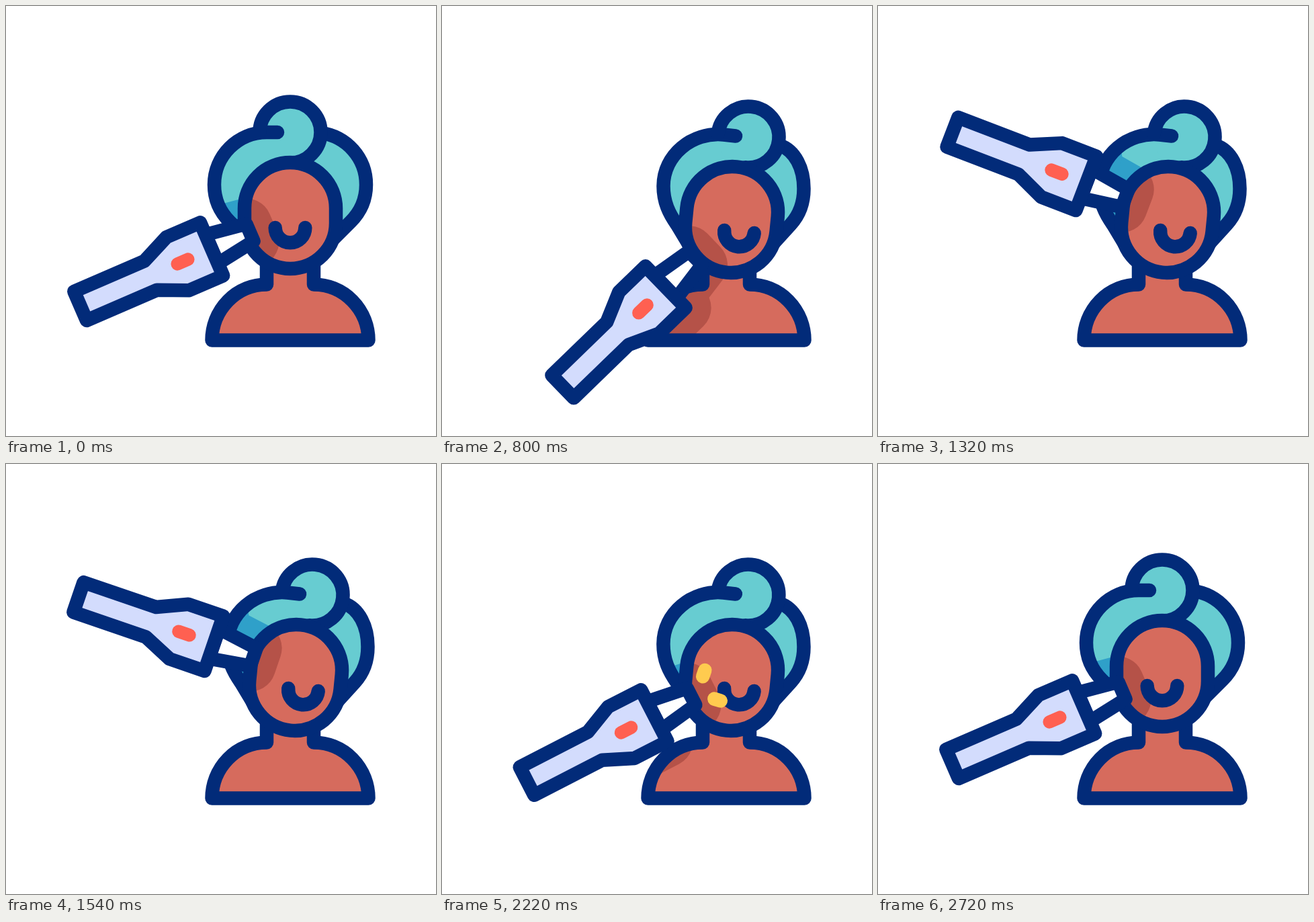
Write an HTML page with a canvas that moves like this. It is 640 px wide and 640 px high and loops after 3000 ms.

```html
<!DOCTYPE html>
<html lang="en">
<head>
<meta charset="utf-8">
<title>Skin treatment</title>
<style>
  html, body { margin: 0; height: 100%; overflow: hidden; background: #fff; }
  canvas { display: block; width: 100vw; height: 100vh; }
</style>
</head>
<body>
<canvas id="stage" width="640" height="640"></canvas>
<script>
const ctx = document.getElementById('stage').getContext('2d');
const LOOP = 3000, LINE = 20.5, SHADOW = 76;
const NAVY = '#022b79', SKIN = '#d66b5d', SKIN_DARK = '#b55248',
      CLOTH = '#67ccd1', CLOTH_DARK = '#2fa0c9',
      SHELL = '#d3dcfd', RED = '#ff6051', YELLOW = '#ffcb4f';

// Device pose over time: [ms, x, y, degrees], centred on its button
const POSES = [
  [200, 263, 380.5, -23.4], [380, 278, 402, -30], [690, 300, 454, -45],
  [800, 299, 451, -44.1], [1120, 255, 391, -16], [1200, 248, 325, 2],
  [1280, 266, 247, 21], [1540, 265, 252, 18.9], [1680, 250, 335, -4],
  [1820, 253.5, 405.5, -24], [2220, 274, 396, -27.2], [2365, 284, 416, -34],
  [2715, 263, 380.5, -23.4]
];
const FLASHES = [200, 2064], FLASH_HALF = 105;

const clamp = v => Math.min(1, Math.max(0, v));
const ease = (t, from, to) => {
  const u = clamp((t - from) / (to - from));
  return u * u * (3 - 2 * u);
};

// Monotone cubic interpolation of one pose column
function track(t, col) {
  const last = POSES.length - 1;
  const slope = i => (POSES[i + 1][col] - POSES[i][col]) / (POSES[i + 1][0] - POSES[i][0]);
  const tangent = i => {
    if (i === 0 || i === last) return 0;
    const a = slope(i - 1), b = slope(i);
    return a * b > 0 ? 2 * a * b / (a + b) : 0;
  };
  if (t <= POSES[0][0]) return POSES[0][col];
  if (t >= POSES[last][0]) return POSES[last][col];
  const i = POSES.findIndex(p => p[0] > t) - 1;
  const span = POSES[i + 1][0] - POSES[i][0], u = (t - POSES[i][0]) / span;
  const s = u * u * (3 - 2 * u);
  return POSES[i][col] * (1 - s) + POSES[i + 1][col] * s
    + span * u * (1 - u) * ((1 - u) * tangent(i) - u * tangent(i + 1));
}

function place(path, x, y, deg) {
  const out = new Path2D();
  out.addPath(path, new DOMMatrix().translate(x, y).rotate(deg));
  return out;
}

function stroke(path, color = NAVY, width = LINE) {
  ctx.strokeStyle = color;
  ctx.lineWidth = width;
  ctx.stroke(path);
}

function fill(path, color) {
  ctx.fillStyle = color;
  ctx.fill(path);
}

function shaded(path, color, dark, casters) {
  fill(path, color);
  ctx.save();
  ctx.clip(path);
  for (const c of casters) {
    fill(c, dark);
    stroke(c, dark, SHADOW);
  }
  ctx.restore();
}

// Shapes in their own coordinates
const torso = new Path2D('M388 385V414.5A81.5 83 0 0 0 306.5 497.5H539.5A81.5 83 0 0 0 458 414.5V385');
const face = new Path2D('M-68-11A68 68 0 0 1 68-11V11A68 68 0 0 1-68 11Z');
const smile = new Path2D('M-22.3 0A22.3 22.3 0 0 0 22.3 0');
const bunDisc = new Path2D('M-45.5 0a45.5 45.5 0 1 1 91 0a45.5 45.5 0 1 1-91 0');
const bunLine = new Path2D('M-45.5 0A45.5 45.5 0 1 1 0 45.5');
const shell = new Path2D('M-166-23.5H-52L-8-43H47V43H-8L-52 23.5H-166Z');
const nozzle = new Path2D('M47-23.4L109-14V14L47 23.4Z');
const button = new Path2D('M-8.5 0H8.5');

// Towel sides: points facing front and points with the head turned.
// Each is start, line, cubic, cubic, line
const LEFT = [
  [404, 188, 388, 188, 345, 188, 310, 223, 310, 266, 310, 288, 319, 307, 333, 321, 358, 346],
  [437, 193.5, 419, 191.5, 372, 187, 329.5, 222, 329.5, 268, 329.5, 292, 338, 309, 350, 326, 368, 356]
];
const RIGHT = [
  [462, 188, 468, 188.6, 507, 194, 536, 226, 536, 266, 536, 288, 527, 307, 513, 321, 487, 347],
  [496, 205, 502, 207, 526, 215, 538.5, 242, 538.5, 272, 538.5, 296, 530, 313, 519, 325, 491, 356]
];

function side([front, turned], turn, center) {
  const p = front.map((v, i) => v + (turned[i] - v) * turn);
  const line = new Path2D();
  line.moveTo(p[0], p[1]);
  line.lineTo(p[2], p[3]);
  line.bezierCurveTo(...p.slice(4, 10));
  line.bezierCurveTo(...p.slice(10, 16));
  line.lineTo(p[16], p[17]);
  const area = new Path2D(line);
  area.lineTo(...center);
  area.closePath();
  return { line, area };
}

function drawHead(turn, casters) {
  const center = [423 + 8 * turn, 312 + 6 * turn], tilt = 5.6 * turn;
  const bunAt = [423 + 33 * turn, 188 + 7 * turn, tilt];
  const left = side(LEFT, turn, center), right = side(RIGHT, turn, center);

  shaded(right.area, CLOTH, CLOTH_DARK, casters);
  stroke(right.line);
  shaded(left.area, CLOTH, CLOTH_DARK, casters);
  shaded(place(bunDisc, ...bunAt), CLOTH, CLOTH_DARK, casters);
  stroke(left.line);
  stroke(place(bunLine, ...bunAt));

  const skin = place(face, ...center, tilt);
  shaded(skin, SKIN, SKIN_DARK, casters);
  stroke(skin);
  stroke(place(smile, 423 + 19.5 * turn, 330 + 6 * turn, 5.2 * turn));
}

function drawFlash(t, pose) {
  for (const start of FLASHES) {
    const head = clamp((t - start) / FLASH_HALF);
    const tail = clamp((t - start) / FLASH_HALF - 1);
    if (head <= tail) continue;
    for (const dir of [-1, 1]) {
      const ray = new Path2D();
      for (const k of [tail, head]) ray.lineTo(131 + 14 * k, dir * (12 + 13.6 * k));
      stroke(place(ray, ...pose), YELLOW);
    }
  }
}

function draw(t) {
  const pose = [1, 2, 3].map(col => track(t, col));
  const tip = place(nozzle, ...pose), body = place(shell, ...pose);
  const turn = ease(t, 200, 700) - ease(t, 2200, 2712);

  ctx.fillStyle = '#fff';
  ctx.fillRect(0, 0, 640, 640);
  shaded(torso, SKIN, SKIN_DARK, [tip, body]);
  stroke(torso);
  drawHead(turn, [tip, body]);

  fill(tip, '#fff');
  stroke(tip);
  fill(body, SHELL);
  stroke(body);
  stroke(place(button, ...pose), RED, 19.5);
  drawFlash(t, pose);
}

ctx.lineCap = ctx.lineJoin = 'round';
const began = performance.now();
function tick() {
  draw((performance.now() - began) % LOOP);
  requestAnimationFrame(tick);
}
tick();
</script>
</body>
</html>
```
